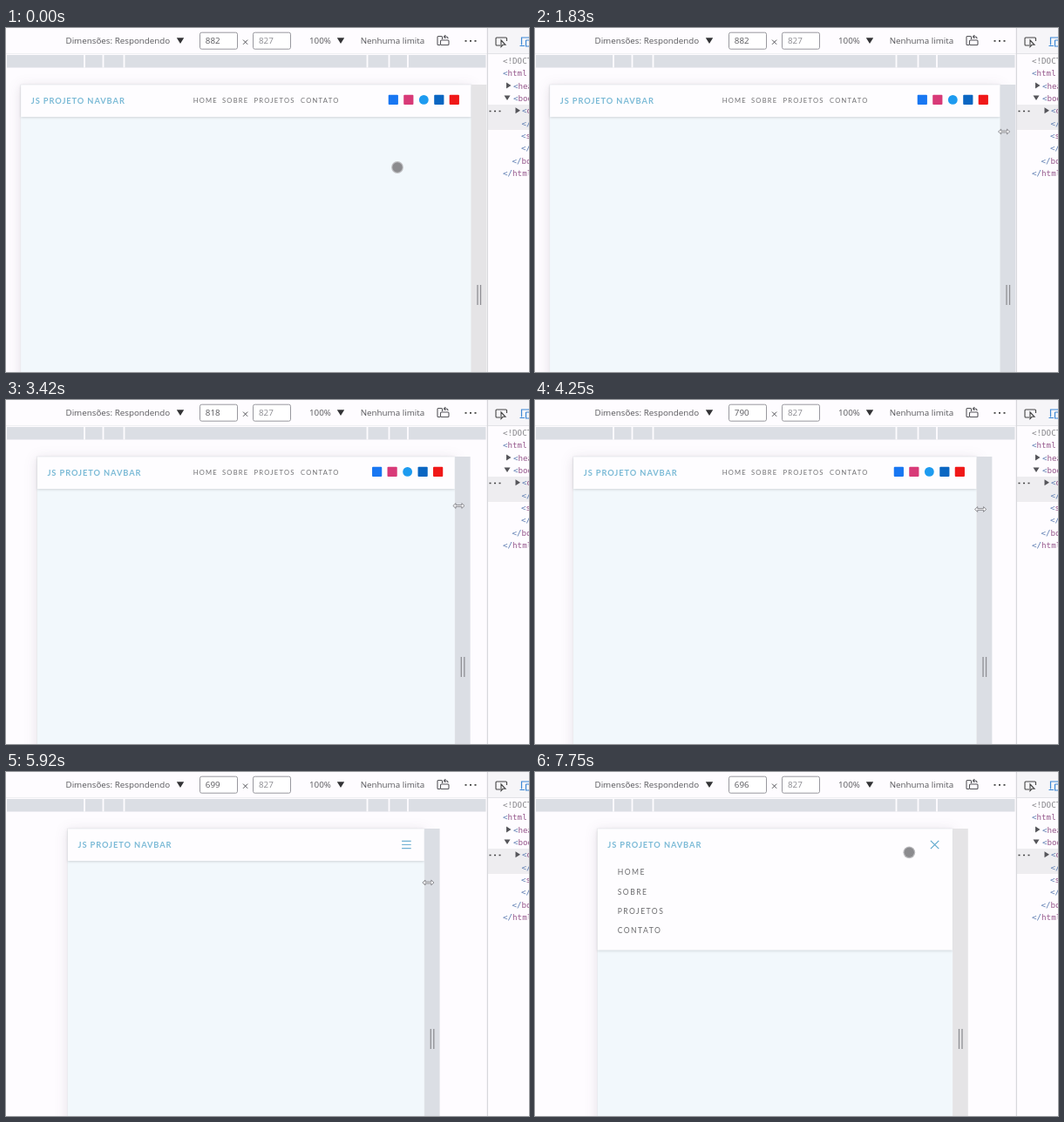
Recreate the animation shown at these times as an HTML page. Size 600x395 px, loop 8 s.

```html
<!DOCTYPE html>
<html lang="pt">
<head>
<meta charset="utf-8">
<title>Navbar</title>
<style>
html, body { margin: 0; width: 100%; height: 100%; overflow: hidden; background: #fefcff; }
svg { display: block; width: 100vw; height: 100vh; }
.ui { font: 9.8px "Open Sans", "Noto Sans", sans-serif; fill: #58585c; }
.brand { font: 700 9.3px Lato, sans-serif; letter-spacing: .9px; fill: #7bbad6; }
.links { font: 7.6px Lato, sans-serif; letter-spacing: 1.25px; fill: #707073; }
.menu { font: 8.6px Lato, sans-serif; letter-spacing: 1.45px; fill: #6c6c6f; }
.code { font: 9.2px "DejaVu Sans Mono", monospace; fill: #94558a; }
.code .b { fill: #5b7bb0; }
.code .g { fill: #848488; }
.line { fill: none; stroke: #55555a; }
#page { filter: drop-shadow(0 2px 7px rgba(60, 40, 70, .13)); }
#head { filter: drop-shadow(0 1.5px 1.8px rgba(0, 0, 0, .14)); }
</style>
</head>
<body>
<svg viewBox="0 0 600 395" preserveAspectRatio="none">
  <defs><clipPath id="clip"><rect id="clipBox" x="0" y="102" width="600" height="0"/></clipPath></defs>
  <rect width="600" height="395" fill="#fefcff"/>

  <rect id="page" y="65" height="350" fill="#f2f8fc" stroke="#e6e6ea" stroke-width=".6"/>
  <rect id="head" y="65.4" fill="#fefdff"/>
  <text id="brand" class="brand" y="86.6">JS PROJETO NAVBAR</text>
  <g id="wide">
    <g class="links">
      <text x="214.7" y="86.4">HOME</text><text x="248" y="86.4">SOBRE</text>
      <text x="284.5" y="86.4">PROJETOS</text><text x="338" y="86.4">CONTATO</text>
    </g>
    <g id="social"></g>
  </g>
  <g clip-path="url(#clip)"><g id="menu" class="menu"></g></g>
  <rect id="tap" y="65" width="17.5" height="47.5" fill="#a9def4"/>
  <path id="burger" d="M-5.3-4.2H5.3M-5.3 0H5.3M-5.3 4.2H5.3" fill="none" stroke="#6fb0d2" stroke-width="1.2"/>
  <path id="cross" d="M-4.7-4.7L4.7 4.7M4.7-4.7L-4.7 4.7" fill="none" stroke="#5fa8cd" stroke-width="1.2"/>

  <g id="handle">
    <rect id="rail" y="65" width="17.5" height="330"/>
    <path d="M7.2 295V318M10.7 295V318" stroke="#8f8f94" stroke-width="1.3"/>
  </g>

  <path d="M0 29.5H552" stroke="#efeff2"/>
  <rect x="1" y="31" width="549.5" height="14.5" fill="#dbdee4"/>
  <path d="M90 31V45.5M111.5 31V45.5M135.5 31V45.5M414.5 31V45.5M439.5 31V45.5M461 31V45.5" stroke="#fefcff" stroke-width="1.8"/>
  <g class="ui">
    <text x="68.5" y="18.1">Dimensões: Respondendo</text>
    <path d="M195.8 11.2H204.2L200 18ZM379.8 11.2H388.2L384 18Z" fill="#333336"/>
    <rect x="222.5" y="5.2" width="43" height="19" rx="2" fill="#fff" stroke="#98989e"/>
    <rect x="283.5" y="5.2" width="43" height="19" rx="2" fill="#fff" stroke="#98989e"/>
    <text id="size" x="228.8" y="18.1"></text>
    <text x="290" y="18.1" fill="#8c8c91">827</text>
    <path d="M272 13.6L277.2 18.8M277.2 13.6L272 18.8" class="line"/>
    <text x="348" y="18.1">100%</text>
    <text x="406.7" y="18.1">Nenhuma limita</text>
  </g>
  <g class="line" stroke-width="1.1">
    <path d="M500.5 13V10.5Q500.5 9.5 499.5 9.5H496Q495 9.5 495 10.5V18.5Q495 19.5 496 19.5H498"/>
    <rect x="498.5" y="14" width="9.5" height="5.5" rx="1"/>
    <path d="M502.5 10H505Q507 10 507 12.3M504.3 8.2L502.5 10L504.3 11.8"/>
  </g>
  <path d="M526.5 14.8H528.5M532 14.8H534M537.5 14.8H539.5" stroke="#444" stroke-width="1.7"/>

  <rect x="552" width="48" height="395" fill="#fefcff"/>
  <rect x="552" width="48" height="29.5" fill="#f6f5f8"/>
  <path d="M552.3 0V395" stroke="#cfcfd4"/>
  <path d="M553 29.5H600" stroke="#e2e2e6"/>
  <rect x="553" y="88" width="47" height="29" fill="#eeedf0"/>
  <path d="M567 20H563Q562 20 562 19V12Q562 11 563 11H573.5Q574.5 11 574.5 12V15M568 14V21.5L570 19.3H573Z" fill="none" stroke="#444" stroke-width="1.1"/>
  <path d="M591.5 19.5V11H601M589.5 20.5H595M596.5 14H601M596.5 14V21H601" fill="none" stroke="#3b87d6" stroke-width="1.2"/>
  <path d="M574 62.5L579.5 66L574 69.5ZM571.5 77.5H578.5L575 83ZM584.5 91.2L590 94.7L584.5 98.2Z" fill="#55555a"/>
  <path d="M554.5 95.5H556.5M560 95.5H562M565.5 95.5H567.5" stroke="#444" stroke-width="1.7"/>
  <g id="code" class="code"></g>

  <g id="touch"><circle r="6.9" fill="#bdbdc0"/><circle id="dot" r="5.7"/></g>
  <path id="arrow" d="M-6.6 0L-3.4-2.9V-.9H3.4V-2.9L6.6 0L3.4 2.9V.9H-3.4V2.9Z" fill="#f4f4f6" stroke="#77777c" stroke-width=".8"/>
</svg>
<script>
const LOOP = 8000, MID = 275.3, SCALE = 0.2931, BREAK = 768;
const $ = id => document.getElementById(id);
const set = (id, attrs) => { for (const k in attrs) $(id).setAttribute(k, attrs[k]); };
const move = (id, x, y) => set(id, { transform: `translate(${x} ${y})` });
const show = (id, on) => set(id, { visibility: on ? 'visible' : 'hidden' });

const widths = [[2090, 882], [2920, 855], [3420, 818], [3750, 804], [4250, 790],
  [4580, 770], [5170, 728], [5420, 715], [6000, 696]];
const dragY = [[1830, 119], [3420, 121.5], [4250, 125.5], [5170, 127]];
const before = [[330, 449, 160], [670, 457, 122], [920, 457, 122], [1670, 537.5, 119]];
const after = [[6250, 484, 127], [6830, 456, 85], [7170, 456, 85], [7650, 429.3, 92.3]];

// Piecewise linear value of column c at time t.
function at(keys, t, c = 1) {
  if (t <= keys[0][0]) return keys[0][c];
  for (let i = 1; i < keys.length; i++) {
    const a = keys[i - 1], b = keys[i];
    if (t < b[0]) return a[c] + (b[c] - a[c]) * (t - a[0]) / (b[0] - a[0]);
  }
  return keys[keys.length - 1][c];
}

// CSS "ease": cubic-bezier(.25, .1, .25, 1).
function ease(x) {
  if (x <= 0) return 0;
  if (x >= 1) return 1;
  let lo = 0, hi = 1, s = 0.5;
  for (let i = 0; i < 20; i++) {
    s = (lo + hi) / 2;
    const bx = 0.75 * s * (1 - s) + s ** 3;
    if (bx < x) lo = s; else hi = s;
  }
  return 0.3 * s * (1 - s) ** 2 + 3 * s * s * (1 - s) + s ** 3;
}

$('social').innerHTML = ['#1877f2', '#d83a78', '#1d9bf0', '#0a66c2', '#f01818'].map((color, i) => {
  const x = -89.5 + 17.5 * i;
  return i === 2
    ? `<circle cx="${x}" cy="82.4" r="5.4" fill="${color}"/>`
    : `<rect x="${x - 5.6}" y="76.8" width="11.2" height="11.2" rx="1" fill="${color}"/>`;
}).join('');

$('menu').innerHTML = ['HOME', 'SOBRE', 'PROJETOS', 'CONTATO']
  .map((s, i) => `<text x="94.7" y="${118.4 + 22.2 * i}">${s}</text>`).join('');

const tags = [[570, '', '<!DOCTYPE'], [570, '<', 'html'], [582, '<', 'head'], [582, '<', 'body'],
  [592, '<', 'div'], [591.5, '</', 'div'], [591, '<', 'script'], [591, '</', 'script'],
  [580.5, '</', 'body'], [570, '</', 'html']];
$('code').innerHTML = tags.map(([x, mark, name], i) =>
  `<text x="${x}" y="${40.9 + 14.35 * i}"><tspan class="b">${mark.replace('<', '&lt;')}</tspan>` +
  `<tspan${mark ? '' : ' class="g"'}>${name.replace('<', '&lt;')}</tspan></text>`).join('');

function cursor(t, right) {
  if (t < 1670) return [at(before, t), at(before, t, 2)];
  if (t < 6250) return [right + 4.3, at(dragY, t)];
  return [at(after, t), at(after, t, 2)];
}

function draw(t) {
  const w = at(widths, t);
  const left = MID - w * SCALE, right = MID + w * SCALE;
  const open = ease((t - 6900) / 500), bottom = 102 + 102.5 * open;
  const wide = w > BREAK, closed = t < 7120;

  $('size').textContent = Math.round(w);
  set('page', { x: left, width: right - left });
  set('head', { x: left + 0.4, width: right - left - 0.8, height: bottom - 65.4 });
  set('brand', { x: left + 12 });
  show('wide', wide);
  move('social', right, 0);
  set('clipBox', { height: bottom - 102 });
  move('menu', 0, -46 * (1 - open));

  show('burger', !wide && closed);
  show('cross', !closed);
  move('burger', right - 20.7, 83.5);
  move('cross', right - 20.7, 83.5);
  set('tap', { x: right - 29.5 });
  show('tap', t >= 6900 && closed);

  const [x, y] = cursor(t, right);
  const over = x > right;
  move('handle', right, 0);
  set('rail', { fill: over ? '#dbdee4' : '#e5e4e6' });
  move('touch', x, y);
  move('arrow', x, y);
  show('touch', !over);
  show('arrow', over);
  set('dot', { fill: t >= 6900 && closed ? '#4d6270' : '#8b8b8e' });
}

function tick(now) {
  const step = Math.floor((now % LOOP + 4) * 12 / 1000);
  draw(step * 1000 / 12 % LOOP);
  requestAnimationFrame(tick);
}
draw(0);
requestAnimationFrame(tick);
</script>
</body>
</html>
```
